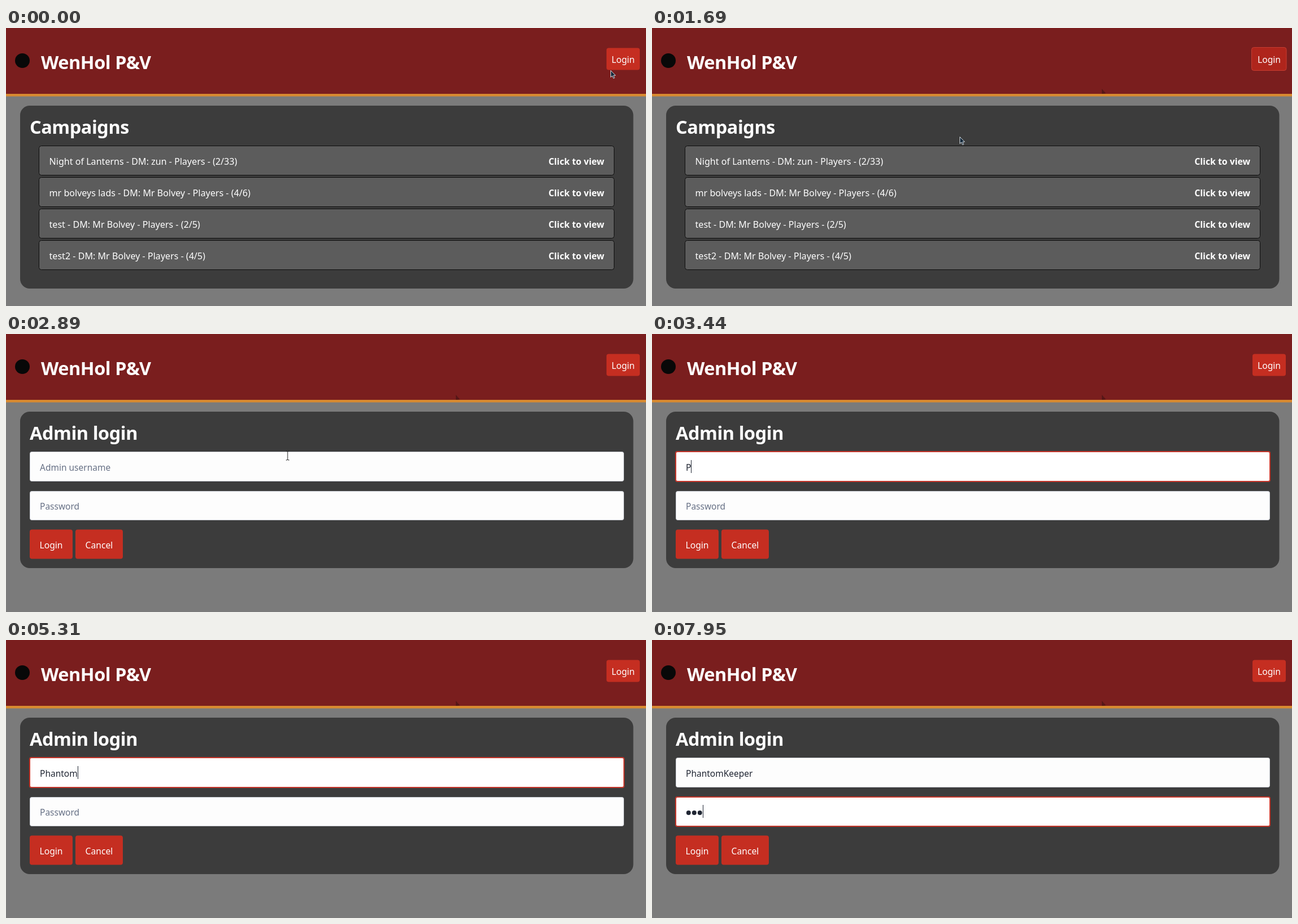
An HTML page that plays this animation: 1134x494 px, repeating every 8000 ms.

```html
<!DOCTYPE html>
<html lang="en">
<head>
<meta charset="utf-8">
<title>Campaign login</title>
<style>
  html, body { margin: 0; width: 100%; height: 100%; overflow: hidden; background: #7b7b7b; }
  svg { display: block; }
  text { font: 16.1px "Noto Sans", "Open Sans", sans-serif; fill: #fff; white-space: pre; }
  .big { font-size: 32.5px; font-weight: 700; letter-spacing: -.5px; }
  .view { font-size: 15.8px; font-weight: 700; text-anchor: end; }
  .panel { fill: #3c3c3c; }
  .row { fill: #5c5c5c; stroke: #0c0c0c; }
  .btn { fill: #c52e21; }
  .label { font-size: 15.7px; text-anchor: middle; }
  .field { fill: #fdfdfd; stroke: #c9ccd3; }
  .focus { fill: #fff; stroke: #c5362a; stroke-width: 2; }
  .hint { font-size: 15.5px; fill: #667085; }
  .typed { font-size: 15.5px; fill: #202633; }
  .pointer { fill: #14283a; stroke: #e4eaf0; stroke-width: .9; stroke-linejoin: round; }
</style>
</head>
<body>
<svg width="1134" height="494" viewBox="0 0 1134 494">
  <defs><clipPath id="iconBox"><rect x="17" y="44" width="26" height="28"/></clipPath></defs>
  <rect width="1134" height="494" fill="#7b7b7b"/>
  <rect width="1134" height="117" fill="#7a1e1e"/>
  <rect y="117" width="1134" height="4.5" fill="#d98a30"/>
  <circle id="icon" cx="29" cy="58" r="13" fill="#080808"/>
  <text id="alt" x="17" y="64" clip-path="url(#iconBox)">D20</text>
  <text class="big" x="62" y="73">WenHol P&amp;V</text>
  <path id="smudge" d="M797 108L804 116L800 117H797Z" fill="#561717"/>

  <rect id="navBtn" class="btn" x="1064" y="35.5" width="59" height="39" rx="4"/>
  <rect id="navRing" x="1062.5" y="34.5" width="61.5" height="41" rx="4" fill="#af251c" stroke="#c73d31"/>
  <text class="label" x="1093.5" y="62">Login</text>

  <g id="listPage">
    <rect class="panel" x="25" y="138" width="1086.5" height="325" rx="17"/>
    <text class="big" x="42" y="188">Campaigns</text>
    <g id="rows"></g>
  </g>

  <g id="loginPage">
    <rect class="panel" x="25" y="138" width="1086.5" height="278" rx="17"/>
    <text class="big" x="42" y="188">Admin login</text>
    <rect class="field" x="42.5" y="209.5" width="1052" height="52" rx="3"/>
    <rect class="field" x="42.5" y="279.5" width="1052" height="51" rx="3"/>
    <rect id="userFocus" class="focus" x="42" y="209" width="1053" height="53" rx="3"/>
    <rect id="passFocus" class="focus" x="42" y="279" width="1053" height="52" rx="3"/>
    <text id="userHint" class="hint" x="60" y="243">Admin username</text>
    <text id="passHint" class="hint" x="60" y="311.5">Password</text>
    <text id="user" class="typed" x="60" y="243"></text>
    <g id="dots" fill="#202633">
      <circle cx="64.8" cy="307" r="4"/>
      <circle cx="74.8" cy="307" r="4"/>
      <circle cx="84.8" cy="307" r="4"/>
    </g>
    <rect id="caret" width="1" height="23" fill="#202633"/>
    <rect class="btn" x="42" y="347.5" width="76" height="52" rx="4"/>
    <text class="label" x="80" y="381">Login</text>
    <rect class="btn" x="123" y="347.5" width="84" height="52" rx="4"/>
    <text class="label" x="165" y="381">Cancel</text>
  </g>

  <g id="cursor">
    <path id="arrow" class="pointer" d="M.5 .5V12.5L3.3 10L5.4 14.6L7.3 13.7L5.3 9.3H9Z"/>
    <path id="hand" class="pointer" d="M3.5 1.5Q4.6 0 5.7 1.5V6L11.5 7.3Q13 7.8 12.6 10L11.5 15.5H5L.8 9.8Q1.5 8 3.5 9.5Z"/>
    <path id="beam" d="M-3 -8H-1L0 -7L1 -8H3M0 -7V7M-3 8H-1L0 7L1 8H3" fill="none" stroke="#222"/>
  </g>
</svg>
<script>
const LOOP = 8000;
const USER = "PhantomKeeper";
const USER_KEYS = [3440, 3960, 4160, 4360, 4560, 5240, 5310, 5700, 5830, 5960, 6090, 6420, 6490];
const PASS_KEYS = [7490, 7820, 7950];
const CAMPAIGNS = [
  "Night of Lanterns - DM: zun - Players - (2/33)",
  "mr bolveys lads - DM: Mr Bolvey - Players - (4/6)",
  "test - DM: Mr Bolvey - Players - (2/5)",
  "test2 - DM: Mr Bolvey - Players - (4/5)"
];
const START = [1071, 75];
// Pointer moves: first step, last step, number of steps, end point
const MOVES = [
  [70, 220, 3, [1080, 59]],
  [900, 1230, 6, [724, 118]],
  [1420, 1690, 5, [545, 193]],
  [2610, 2950, 6, [490, 220]]
];

const $ = id => document.getElementById(id);
const show = (id, on) => { $(id).style.display = on ? "" : "none"; };
const pressed = (keys, t) => keys.filter(k => t >= k).length;
const stepped = (t, from, to, n) =>
  t < from ? 0 : Math.min(n, Math.floor((t - from) / ((to - from) / (n - 1)) + 1e-6) + 1) / n;

$("rows").innerHTML = CAMPAIGNS.map((name, i) => {
  const y = 209.5 + i * 56;
  return `<rect class="row" x="58.5" y="${y}" width="1019" height="52" rx="4"/>
    <text x="76.5" y="${y + 33.5}">${name}</text>
    <text class="view" x="1060" y="${y + 33.5}">Click to view</text>`;
}).join("");

function pointerAt(t) {
  let [x, y] = START;
  for (const [from, to, n, end] of MOVES) {
    const p = stepped(t, from, to, n);
    x += (end[0] - x) * p;
    y += (end[1] - y) * p;
  }
  return [x, y];
}

function drawPointer(t) {
  const [x, y] = pointerAt(t);
  const beam = t >= 2610 && y >= 209;
  const hand = t >= 145 && t < 900;
  $("cursor").setAttribute("transform", `translate(${Math.round(x)} ${Math.round(y)})`);
  show("cursor", t < 3440);
  show("beam", beam);
  show("hand", hand);
  show("arrow", !beam && !hand);
}

function drawHeader(t) {
  const missing = t >= 2150 && t < 2420;
  show("icon", !missing);
  show("alt", missing);
  show("smudge", t >= 1164);
  $("navBtn").style.fill = t >= 145 && t < 2150 ? "#af251c" : "";
  show("navRing", t >= 430 && t < 2150);
}

function drawForm(t) {
  const onPass = t >= 7020;
  const corrected = t >= 4960 && t < 5090 ? 1 : 0;
  const count = pressed(USER_KEYS, t) - corrected;
  const dots = pressed(PASS_KEYS, t);
  $("user").textContent = USER.slice(0, count);
  show("userHint", !count);
  show("passHint", !dots);
  [...$("dots").children].forEach((dot, i) => { dot.style.display = i < dots ? "" : "none"; });
  $("userFocus").style.opacity = onPass ? 0 : stepped(t, 3130, 3330, 3);
  show("passFocus", onPass);
  show("caret", t >= 3130);
  const typedWidth = count ? $("user").getComputedTextLength() : 0;
  $("caret").setAttribute("x", Math.round(onPass ? 59.5 + dots * 10 : 60 + typedWidth));
  $("caret").setAttribute("y", onPass ? 293 : 224);
}

function draw(t) {
  show("listPage", t < 2150);
  show("loginPage", t >= 2150);
  drawHeader(t);
  if (t >= 2150) drawForm(t);
  drawPointer(t);
}

let start;
function tick(now) {
  start ??= now;
  draw((now - start) % LOOP);
  requestAnimationFrame(tick);
}
draw(0);
requestAnimationFrame(tick);
</script>
</body>
</html>
```
